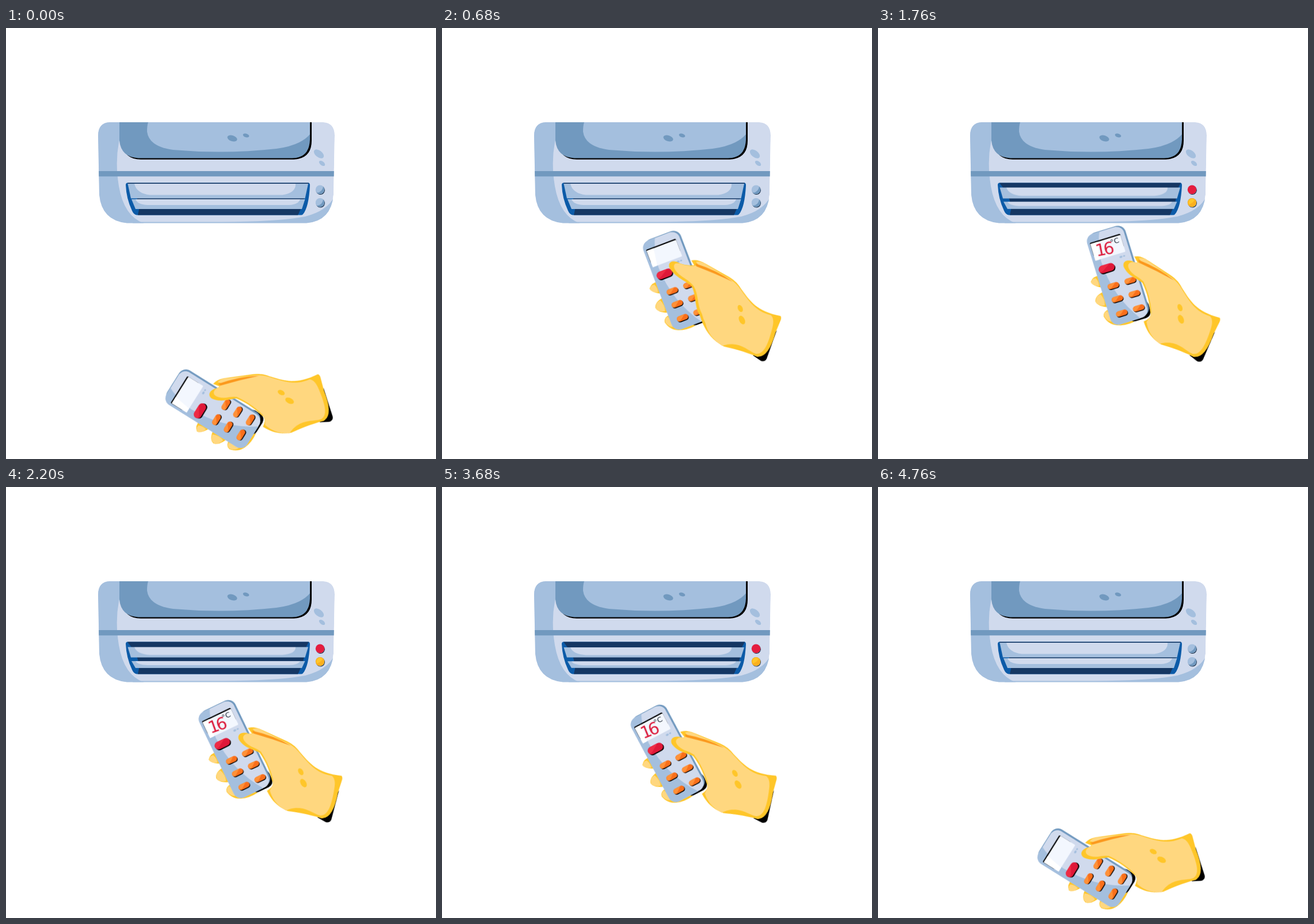
Write an HTML page without scripts that moves like this. It is 747 by 750 pixels and loops after 4800 ms.

```html
<!DOCTYPE html>
<html lang="en">
<head>
<meta charset="utf-8">
<title>Air conditioner and remote</title>
<style>
  html, body { margin: 0; width: 100%; height: 100%; overflow: hidden; background: #fff; }
  svg { display: block; width: 100vw; height: 100vh; }

  .pale { fill: #d0daed; }
  .sky { fill: #a4bfde; }
  .steel { fill: #7199bf; }
  .navy { fill: #153763; }
  .blue { fill: #0c5ba8; }
  .skin { fill: #ffd77f; }
  .gold { fill: #ffc629; }

  .hand, .slat, .lit, .palm, .palm-light { animation: 4.8s infinite; }

  .hand { transform-origin: 577px 574px; animation-name: swing; animation-timing-function: cubic-bezier(.37, 0, .63, 1); }
  @keyframes swing {
    0%, 100% { transform: translate(-2px, 92px) rotate(-35.5deg); }
    12.1% { transform: translate(-1px, -2.5px) rotate(3deg); }
    20.4% { transform: rotate(-5.6deg); animation-timing-function: cubic-bezier(.3, .2, .6, 1); }
    35.8% { transform: rotate(5.6deg); }
    50.4% { transform: rotate(-5.6deg); }
    63.5% { transform: rotate(5.6deg); }
    77.4% { transform: rotate(-5.6deg); }
    90.4% { transform: rotate(1deg); }
    98.7% { transform: translate(-2px, 92px) rotate(-35.5deg); }
  }

  .slat { animation-name: tilt; animation-timing-function: linear; }
  .upper { transform-origin: 0 297px; }
  .lower { transform-origin: 0 315px; }
  @keyframes tilt {
    0%, 14.6%, 96.7%, 100% { transform: scaleY(1); }
    26.7% { transform: scaleY(.82); }
    35.8% { transform: scaleY(.75); }
    45.8% { transform: scaleY(.71); }
    60% { transform: scaleY(.64); }
    76.7% { transform: scaleY(.69); }
    83% { transform: scaleY(.73); }
  }

  .lit { animation-name: power; animation-timing-function: linear; }
  @keyframes power {
    0%, 15%, 90%, 100% { opacity: 0; }
    18%, 87.5% { opacity: 1; }
  }

  .palm { animation-name: press; animation-timing-function: ease-in-out; }
  @keyframes press {
    0%, 9%, 20%, 83%, 92%, 100% { d: path("M440 418C470 428 500 437 514 454C534 480 545 496 587 503Q589 506 587 511L579 532Q568 577 548 575C525 566 505 562 490 559C470 549 462 536 456 522Q470 515 466 505C463 490 458 472 447 455C435 448 420 445 412 430C409 420 420 416 430 421Q436 422 440 418Z"); }
    12.5%, 15.5%, 86%, 88.5% { d: path("M440 418C470 428 500 437 514 454C534 480 545 496 587 503Q589 506 587 511L579 532Q568 577 548 575C525 566 505 562 490 559C470 549 460 536 452 520Q450 515 446 505C436 490 440 470 430 455C418 446 400 440 391 424C388 414 398 410 410 417Q425 422 440 418Z"); }
  }
  .palm-light { animation-name: press-light; animation-timing-function: ease-in-out; }
  @keyframes press-light {
    0%, 9%, 20%, 83%, 92%, 100% { d: path("M441 419C471 429 500 438 513 455C533 481 543 496 570 502Q577 508 573 525C567 552 560 571 546 570C530 564 515 547 487 558C470 547 464 534 461 522Q470 510 467 500C464 485 458 468 449 453C438 444 428 444 421 432C417 424 424 420 432 421Q437 422 441 419Z"); }
    12.5%, 15.5%, 86%, 88.5% { d: path("M441 419C471 429 500 438 513 455C533 481 543 496 570 502Q577 508 573 525C567 552 560 571 546 570C530 564 515 547 487 558C470 547 460 534 457 520Q453 513 450 503C441 488 444 470 434 455C420 440 408 440 400 426C397 418 402 415 412 418Q426 423 441 419Z"); }
  }

  text { font-family: "DejaVu Sans", sans-serif; }
</style>
</head>
<body>
<svg viewBox="0 0 747 750">
  <defs>
    <clipPath id="body-clip">
      <path id="body" d="M180 164H551Q571 165 571 187L569 290Q565 336 522 339.5H210Q166 335 162 290L160 187Q160 165 180 164Z"/>
    </clipPath>
    <clipPath id="face-clip"><rect id="face" x="-35" y="-85" width="67" height="165" rx="14"/></clipPath>
    <g id="lamp">
      <circle cx=".7" cy="1" r="7.7" fill="#10243c"/>
      <circle r="7.7" class="sky"/>
      <path class="steel" d="M5.5 -5.4A7.7 7.7 0 1 1 -5.4 5.5Q4 4 5.5 -5.4Z"/>
    </g>
    <g id="key">
      <rect x="-10" y="-3.4" width="20.5" height="9.6" rx="4.8"/>
      <rect x="-10.5" y="-4.8" width="20.5" height="9.6" rx="4.8" fill="#f96f1b"/>
      <path d="M-5.5 -4.8H5L-2 1Q-6 4 -9 3.5A5 5 0 0 1 -5.5 -4.8Z" fill="#ff9138"/>
    </g>
    <g id="key-row">
      <use href="#key" x="-12.8"/>
      <use href="#key" x="18"/>
    </g>
  </defs>

  <!-- Air conditioner -->
  <g clip-path="url(#body-clip)">
    <use href="#body" class="pale"/>
    <path class="sky" d="M160 164H206Q186 215 196 275Q205 328 240 340H160Z"/>
    <path class="sky" d="M220 337.5H375Q475 337 520 328Q558 318 570 294V340H220Z"/>
    <path d="M200 200Q206 228.8 234 228.8H500Q531 227 531 196V164H515V200Z"/>
    <path class="steel" d="M197 164H528V194Q527 226.4 497 226.4H230Q200 225 197 196Z"/>
    <path class="sky" d="M247 164H528V185Q512 204 470 210Q380 220 290 212Q248 206 245 180Q245 170 247 164Z"/>
    <rect class="steel" x="160" y="249" width="411" height="9.3"/>
  </g>
  <ellipse class="steel" rx="8.8" ry="5" transform="translate(393 192) rotate(18)"/>
  <ellipse class="steel" rx="5.5" ry="3.2" transform="translate(417 187) rotate(18)"/>
  <ellipse class="sky" rx="10" ry="5.8" transform="translate(543.5 219) rotate(38)"/>
  <ellipse class="sky" rx="6" ry="3.4" transform="translate(549 235.5) rotate(38)"/>

  <path class="blue" d="M210 269.5H526Q528 270 528 274Q526 312 516 324Q515 325.5 512 325.5H227Q222 325 219 318Q209 297 208 273Q208 270 210 269.5Z"/>
  <path class="navy" d="M211 269.5H526L521 279Q518 305 507 325.5H229L231 316Q230 292 218 279Z"/>
  <g class="slat upper">
    <path class="sky" d="M211.5 271H525L519.5 296.5H217Z"/>
    <path class="pale" d="M223 271H503Q504 287 480 290.5H250Q227 288 223 271Z"/>
  </g>
  <g class="slat lower">
    <path class="sky" d="M218 298H519.5L514 315H225Z"/>
    <path class="pale" d="M225 298H511Q508 307 492 308H246Q228 307 225 298Z"/>
  </g>
  <use href="#lamp" x="545.5" y="281.3"/>
  <use href="#lamp" x="545.5" y="303.8"/>
  <g class="lit">
    <circle cx="545.5" cy="281.3" r="7.7" fill="#e51d3f"/>
    <circle cx="545.5" cy="303.8" r="7.7" fill="#fbb01f"/>
    <path d="M541 299Q545 295 550 299Q547 305 540 307Q538 303 541 299Z" fill="#ffc629"/>
  </g>

  <!-- Hand with remote -->
  <g class="hand">
    <path d="M541 573L555 582Q562 584 565 578L581 528Z"/>
    <g class="gold">
      <path d="M374 449Q360 452 358 462Q361 470 385 471Z"/>
      <path d="M384 476Q368 484 369 495Q374 505 398 503Z"/>
      <path d="M394 507Q384 511 386 520Q395 533 410 533Q425 533 440 524Z"/>
    </g>
    <g class="skin">
      <path d="M366 455Q358 457 359 464Q363 469 373 468Q372 460 366 455Z"/>
      <path d="M377 482Q368 487 370 496Q374 503 386 501Q386 490 377 482Z"/>
      <path d="M391 510Q385 513 387 520Q392 527 400 528Q399 516 391 510Z"/>
    </g>

    <g transform="translate(405 449) rotate(-22.5)">
      <rect x="-4" y="50" width="40" height="32.5" rx="11"/>
      <rect class="steel" x="-31" y="-86" width="66" height="164" rx="14"/>
      <g clip-path="url(#face-clip)">
        <use href="#face" class="pale"/>
        <path class="sky" d="M-36 -86H-8Q-20 -62 -21 -34Q-20 30 16 81H-36Z"/>
      </g>
      <rect x="-30.5" y="-71" width="55" height="24" rx="1.5"/>
      <rect x="-30" y="-69" width="54.5" height="30.5" rx="1.5" fill="#f3f7fe"/>
      <path d="M-30 -69H-17L-22 -38.5H-30Z" fill="#fff"/>
      <g class="lit">
        <text x="-25" y="-43.5" font-size="29" letter-spacing="-4" fill="#dc1c3c" transform="rotate(6 -12 -54)">16</text>
        <text x="4" y="-57" font-size="13" fill="#222b36">°C</text>
      </g>
      <ellipse class="sky" cx="14.3" cy="-32" rx="2.7" ry="1.8"/>
      <ellipse class="sky" cx="20" cy="-32" rx="1.9" ry="1.4"/>
      <rect x="-28.6" y="-25.3" width="28.5" height="13.4" rx="6.7"/>
      <rect x="-29.5" y="-27.2" width="28.5" height="13.4" rx="6.7" fill="#df1838"/>
      <path d="M-23 -27.2H-8L-19 -20Q-24 -16 -28 -17A7 7 0 0 1 -23 -27.2Z" fill="#ee2b45"/>
      <use href="#key-row" y="12"/>
      <use href="#key-row" y="36"/>
      <use href="#key-row" y="62"/>
    </g>

    <path class="gold" d="M429 411Q440 408 454 416L496 438Q510 446 516 457L440 428Z"/>
    <path class="skin" d="M437 413Q446 411 456 418L496 440Q508 447 514 456L446 424Z"/>
    <path class="palm gold"/>
    <path class="palm-light skin"/>
    <path fill="#fb981d" d="M436 416Q474 427 502 446Q470 432 438 421Z"/>
    <ellipse class="gold" rx="4" ry="6.5" transform="translate(516.5 492) rotate(-28)"/>
    <ellipse class="gold" rx="4.8" ry="8" transform="translate(520 512) rotate(-28)"/>
  </g>
</svg>
</body>
</html>
```
